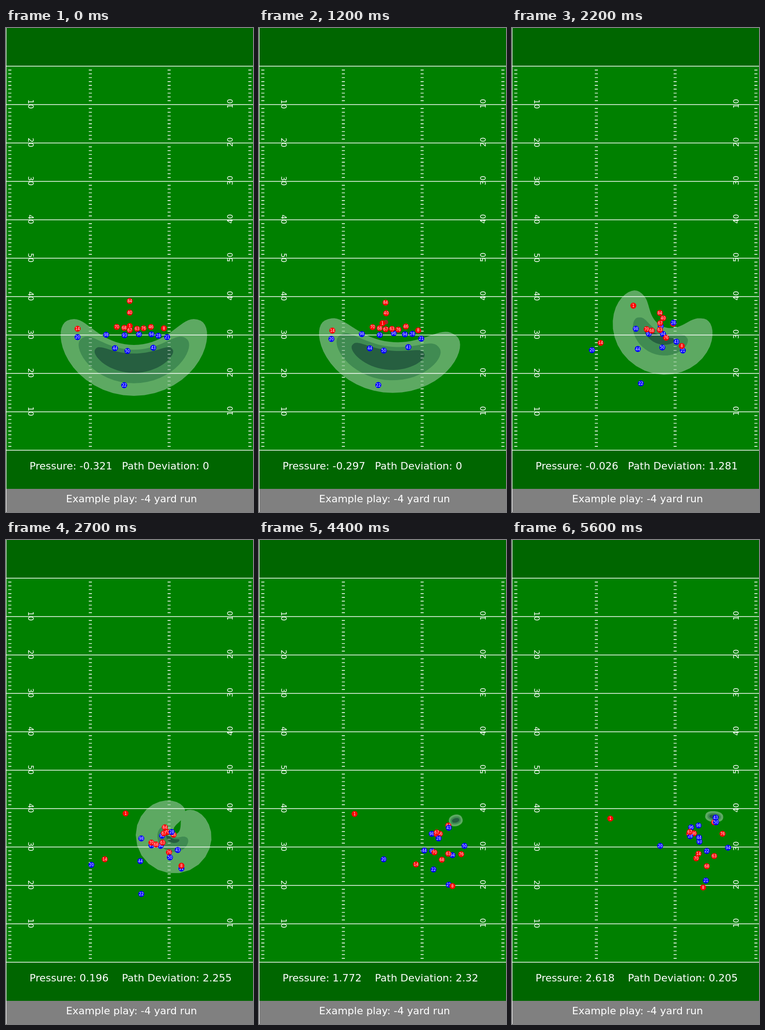
An HTML page for the animation above (5.7 s loop, 535x1046 px).

```html
<!DOCTYPE html>
<html lang="en">
<head>
<meta charset="utf-8">
<title>Example play</title>
<style>
  html, body { margin: 0; width: 100%; height: 100%; overflow: hidden; background: #006600; }
  svg { display: block; width: 100vw; height: 100vh; }
  text { font-family: "DejaVu Sans", Verdana, sans-serif; fill: #fff; }
  .dot text { font-size: 8px; text-anchor: middle; }
  .yard { font-size: 16px; text-anchor: middle; }
  .info { font-size: 22px; white-space: pre; }
</style>
</head>
<body>
<svg id="stage" viewBox="0 0 535 1046" preserveAspectRatio="none"></svg>
<script>
const stage = document.getElementById('stage');
const LOOP = 5700, STEP = 100;
const SNAP = 800, HANDOFF = 1700;
const TOP = 82.5, YARD = 8.3;

function add(tag, attrs, parent = stage, text = '') {
  const node = document.createElementNS('http://www.w3.org/2000/svg', tag);
  for (const key in attrs) node.setAttribute(key, attrs[key]);
  node.textContent = text;
  parent.appendChild(node);
  return node;
}

const rect = (x, y, width, height, fill) => add('rect', { x, y, width, height, fill });
const label = (x, y, text) => add('text', { x, y, class: 'info' }, stage, text);
const mix = (a, b, u) => a + (b - a) * u;
const clamp = u => Math.min(1, Math.max(0, u));

// Monotone cubic through key values, starting from rest and held outside the keys.
function curve(times, values, t) {
  const last = times.length - 1;
  if (t <= times[0]) return values[0];
  if (t >= times[last]) return values[last];
  let i = 0;
  while (t >= times[i + 1]) i++;
  const secant = k => (values[k + 1] - values[k]) / (times[k + 1] - times[k]);
  const slope = k => {
    if (k === 0) return 0;
    if (k === last) return secant(last - 1);
    const a = secant(k - 1), b = secant(k);
    return a * b <= 0 ? 0 : 2 * a * b / (a + b);
  };
  const span = times[i + 1] - times[i], u = (t - times[i]) / span;
  return mix(values[i], values[i + 1], u * u * (3 - 2 * u)) +
    span * u * (1 - u) * (slope(i) * (1 - u) - slope(i + 1) * u);
}

function drawHashes(opacity) {
  let d = '';
  for (let yard = 1; yard < 100; yard++) {
    if (yard % 10 === 0) continue;
    for (const x of [5, 179.5, 350, 525]) d += `M${x} ${(TOP + yard * YARD).toFixed(1)}h6.5`;
  }
  add('path', { d, stroke: '#fff', 'stroke-width': 1.4, opacity });
}

function drawLines() {
  for (let yard = 0; yard <= 100; yard += 10) {
    const y = TOP + yard * YARD;
    rect(0, y - 0.75, 535, 1.5, '#fff');
    if (yard % 100 === 0) continue;
    const name = 50 - Math.abs(50 - yard);
    add('text', { class: 'yard', transform: `translate(48 ${y - 1}) rotate(90)` }, stage, name);
    add('text', { class: 'yard', transform: `translate(490.5 ${y - 2}) rotate(-90)` }, stage, name);
  }
  rect(0, 0, 1, 1046, '#fff');
}

// The contour is an ellipse bent around a circle: (x, y) is the middle of its spine,
// facing is the direction it bulges, pull draws inner levels to the circle's centre
// and focus tightens them.
const POSES = [
  { time: 800, x: 277, y: 740, bend: 0.0071, length: 190, width: 55, facing: 90, pull: 25, focus: 1 },
  { time: 1600, x: 274, y: 719, bend: 0.0061, length: 150, width: 55, facing: 106, pull: 25, focus: 1 },
  { time: 2700, x: 348, y: 672, bend: 0.0238, length: 134, width: 45, facing: 115, pull: 28, focus: 2.4 },
  { time: 3500, x: 390, y: 653, bend: 0.0385, length: 38, width: 10, facing: 80, pull: 3, focus: 1 },
  { time: 4400, x: 426, y: 606, bend: 0.005, length: 15, width: 12.5, facing: 75, pull: 0, focus: 1 },
  { time: 5600, x: 438, y: 598, bend: 0.005, length: 19.5, width: 12, facing: 95, pull: 0, focus: 1 },
];
const LEVELS = [
  { size: 1, fill: '#5da962' },
  { size: 0.66, fill: '#408b52' },
  { size: 0.38, fill: '#265f40' },
];

function poseAt(t) {
  const times = POSES.map(pose => pose.time), pose = {};
  for (const key in POSES[0]) pose[key] = curve(times, POSES.map(p => p[key]), t);
  return pose;
}

function contour(pose, size) {
  const s = size ** pose.focus, radius = 1 / pose.bend;
  const facing = pose.facing * Math.PI / 180;
  const cx = pose.x - radius * Math.cos(facing), cy = pose.y - radius * Math.sin(facing);
  const spread = pose.length * pose.bend * (0.25 + 0.75 * s);
  const points = [];
  for (let k = 0; k < 72; k++) {
    const a = k * Math.PI / 36, sine = Math.sin(a);
    const bulge = Math.sign(sine) * Math.abs(sine) ** 0.8;
    const r = Math.max(0, radius - pose.pull * (1 - s) + pose.width * s * bulge);
    const angle = facing + spread * Math.cos(a);
    points.push(`${(cx + r * Math.cos(angle)).toFixed(1)} ${(cy + r * Math.sin(angle)).toFixed(1)}`);
  }
  return `M${points.join('L')}Z`;
}

// Each player runs from the formation through two waypoints to the end of the play.
const RUN = [SNAP, 2700, 4400, 5600];
const players = {};

function marker(fill, r, name = '') {
  const node = add('g', { class: 'dot' });
  add('circle', { r, fill }, node);
  add('text', { y: 2.9 }, node, name);
  return node;
}

function player(fill, name, route) {
  const stops = route.split(' ').map(stop => stop.split(',').map(Number));
  const axis = k => t => curve(RUN, stops.map(stop => stop[k]), t);
  players[name] = { node: marker(fill, 6.5, name), x: axis(0), y: axis(1) };
}
const red = (name, route) => player('#f00', name, route);
const blue = (name, route) => player('#00f', name, route);

const place = (node, x, y) =>
  node.setAttribute('transform', `translate(${x.toFixed(1)} ${y.toFixed(1)})`);

rect(0, 0, 535, 996, '#006600');
rect(0, TOP, 535, 100 * YARD, '#008000');
rect(0, 996, 535, 50, '#808080');
drawHashes(1);
for (const level of LEVELS) level.node = add('path', { fill: level.fill });
drawHashes(0.6);
drawLines();

const ball = marker('#a52a2a', 5);
red(14, '155,650 214,690 340,701 404,678');
blue(20, '155,668 185,702 270,690 321,661');
blue(98, '217,663 293,645 374,635 404,617');
blue(93, '257,664 315,660 375,672 406,652');
blue(96, '288,662 338,639 384,634 388,621');
blue(94, '315,662 335,661 419,681 468,665');
blue(44, '236,692 291,694 358,671 405,643');
blue(22, '256,772 293,765 378,712 422,672');
blue(21, '349,668 380,710 411,745 420,736');
red(84, '268,590 344,621 410,617 438,610');
red(1, '268,644 259,591 207,592 213,602');
red(40, '268,615 349,631 385,636 384,635');
red(70, '240,646 315,654 380,675 399,688');
red(68, '256,648 325,658 396,691 422,705');
red(76, '298,649 353,675 438,679 456,635');
red(63, '284,650 339,654 410,678 438,683');
red(46, '314,646 363,637 392,635 394,634');
blue(28, '330,665 359,631 389,645 386,640');
red(8, '342,649 380,704 419,748 414,751');
red(67, '268,653 342,634 385,632 385,631');
blue(50, '263,698 355,686 445,661 442,610');
blue(43, '319,691 372,670 411,622 441,600');

const pressure = label(51, 954, '');
const deviation = label(251, 954, '');
label(130, 1025, 'Example play: -4 yard run');

const readings = {
  times: [0, 800, 1600, 2700, 3500, 4400, 5600],
  pressure: [-0.321, -0.275, -0.319, 0.196, -0.9, 1.772, 2.618],
  deviation: [0, 0, 0, 2.255, 1.413, 2.32, 0.205],
};
const reading = (name, t) => +curve(readings.times, readings[name], t).toFixed(3);

function render(t) {
  const pose = poseAt(t);
  for (const { node, size } of LEVELS) node.setAttribute('d', contour(pose, size));
  for (const { node, x, y } of Object.values(players)) place(node, x(t), y(t));

  const center = players[67], runner = players[40];
  const carried = clamp((t - SNAP) / (HANDOFF - SNAP));
  place(ball, mix(center.x(t), runner.x(t), carried), mix(center.y(t), runner.y(t), carried));

  pressure.textContent = 'Pressure: ' + reading('pressure', t);
  deviation.textContent = 'Path Deviation: ' + reading('deviation', t);
}

const start = performance.now();
function tick() {
  const t = (performance.now() - start) % LOOP;
  render(Math.floor(t / STEP) * STEP);
  requestAnimationFrame(tick);
}
tick();
</script>
</body>
</html>
```
